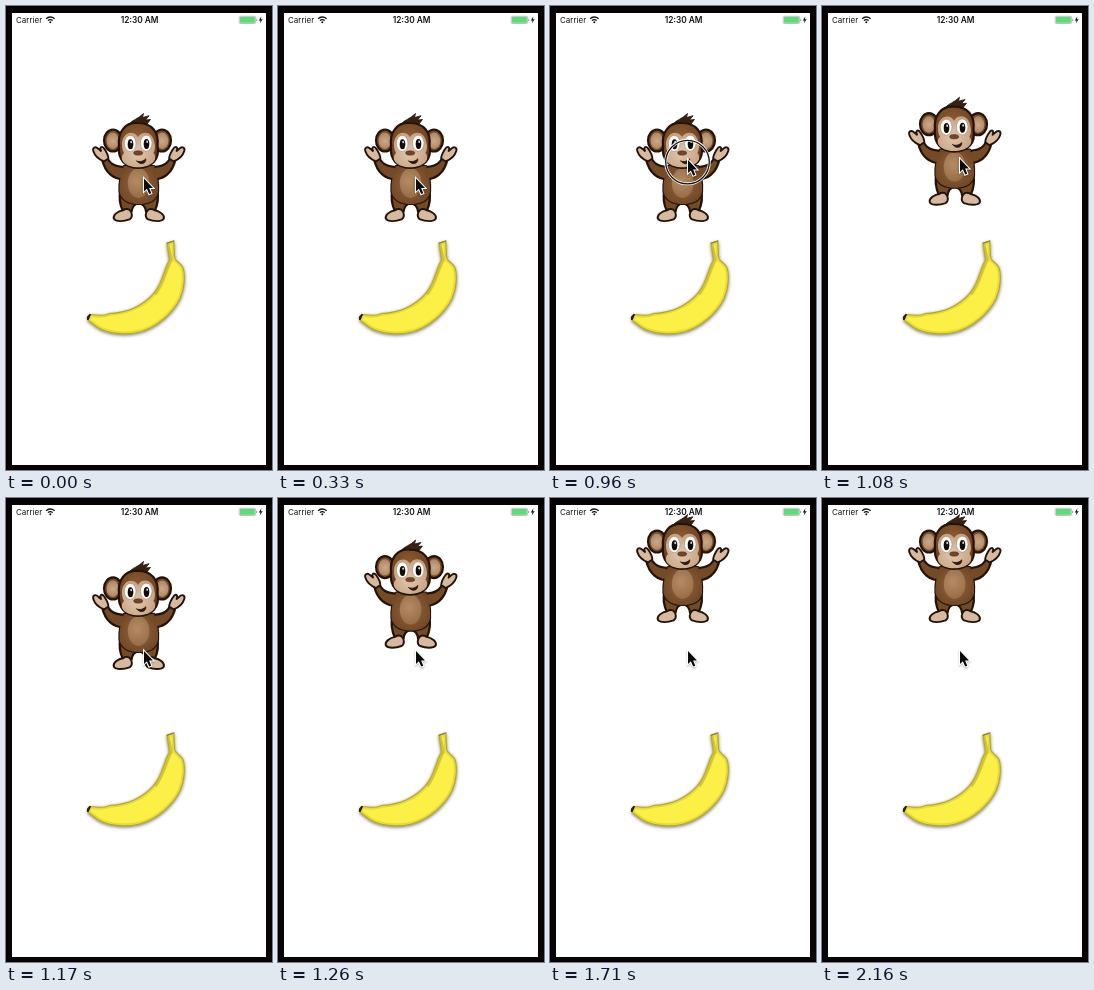
Animation of 266 by 464 pixels, one loop 2220 ms. Source, as an HTML page with a canvas:

```html
<!DOCTYPE html>
<html lang="en">
<head>
<meta charset="utf-8">
<title>Fling the monkey</title>
<style>
html, body { margin: 0; width: 100%; height: 100%; overflow: hidden; background: #070303; }
canvas { display: block; width: 266px; height: 464px; }
</style>
</head>
<body>
<canvas id="stage"></canvas>
<script>
const W = 266, H = 464, LOOP = 2220;
const PRESS = 720, RELEASE = 1036, FLING = 479;
const INK = '#21120a', FUR = '#754a27', SKIN = '#d6b99f';
const canvas = document.getElementById('stage');
const ratio = window.devicePixelRatio || 1;
canvas.width = W * ratio;
canvas.height = H * ratio;
const ctx = canvas.getContext('2d');

const clamp = v => Math.max(0, Math.min(1, v));
const easeOut = u => 1 - (1 - u) ** 2;

function shape(d, fill, stroke, width = 2.2) {
  const path = new Path2D(d);
  if (fill) { ctx.fillStyle = fill; ctx.fill(path); }
  if (stroke) { ctx.strokeStyle = stroke; ctx.lineWidth = width; ctx.stroke(path); }
}

function oval(x, y, rx, ry, fill, stroke, width = 2.2) {
  ctx.beginPath();
  ctx.ellipse(x, y, rx, ry, 0, 0, Math.PI * 2);
  if (fill) { ctx.fillStyle = fill; ctx.fill(); }
  if (stroke) { ctx.strokeStyle = stroke; ctx.lineWidth = width; ctx.stroke(); }
}

function glow(x, y, r, inner, outer) {
  const g = ctx.createRadialGradient(x, y, 0, x, y, r);
  g.addColorStop(0, inner);
  g.addColorStop(1, outer);
  return g;
}

function shadow(color, blur, dy) {
  ctx.shadowColor = color;
  ctx.shadowBlur = blur * ratio;
  ctx.shadowOffsetY = dy * ratio;
}

function text(str, x, font, align) {
  ctx.font = font;
  ctx.textAlign = align;
  ctx.fillStyle = '#111';
  ctx.fillText(str, x, 17);
}

function drawStatusBar() {
  text('Carrier', 10, '8px Inter, sans-serif', 'left');
  text('12:30 AM', 133.6, '600 8.3px Inter, sans-serif', 'center');
  ctx.strokeStyle = '#111';
  ctx.lineWidth = 1.3;
  for (const r of [3.2, 5.8]) {
    ctx.beginPath();
    ctx.arc(44.3, 16.8, r, -Math.PI * 0.76, -Math.PI * 0.24);
    ctx.stroke();
  }
  oval(44.3, 16.2, 1, 1, '#111');
  ctx.strokeStyle = '#9ba69d';
  ctx.lineWidth = 0.7;
  ctx.beginPath();
  ctx.roundRect(233.2, 10.3, 16.4, 7.2, 1.4);
  ctx.stroke();
  ctx.fillStyle = '#5fda76';
  ctx.fillRect(234, 11, 14.8, 5.8);
  ctx.fillStyle = '#9b9b9b';
  ctx.fillRect(250.2, 12.8, 1, 2.2);
  shape('M255.4 10.3 L252.8 14.4 H254.5 L253.8 17.6 L256.6 13.2 H254.9 Z', '#111');
}

function drawBanana() {
  const body = 'M160.5 237 L168.3 234.5 L169 251 C170 255 174.5 256 177.3 261 C180 268 179.5 282 174.5 293 ' +
    'C167 308 151 322 134 326.5 C116 331 98 327 90 321 L81 314 L84 308 C91 308 97 310.5 103 307 ' +
    'C121 306.5 137 299 147 287.5 C157 275 157 264 163 254 Z';
  ctx.save();
  shadow('rgba(0,0,0,.55)', 3.5, 1);
  shape(body, '#fcf047');
  ctx.restore();

  ctx.save();
  ctx.clip(new Path2D(body));
  shape(body, null, 'rgba(190,176,45,.35)', 6);
  shape(body, null, 'rgba(150,140,40,.65)', 2.2);
  shape('M161 237 L165 254 C160 262 158 276 149 288', null, 'rgba(190,174,45,.5)', 4);
  ctx.restore();

  shape('M160.5 237.3 L168.3 234.8', null, '#857d2b', 1.2);
  shape('M81 314 L80.8 311 L83.5 307.8 L85 308.5 L82.6 314 Z', '#29220d');
}

function drawSide() {
  shape('M119 173 C108 174 99 167 96 153 L101 150.5 C103 157 109 161 119 161 Z', FUR, INK);
  shape('M98 155.5 C92 153 88.5 149 87.3 145 C86.3 141.5 89.5 140 92 142.5 L95 145 ' +
    'C93 140.5 96.5 139.5 98.5 143 C100.5 146 102.5 149 102.3 152.5 Z', SKIN, INK, 1.9);
  shape('M114.5 184 C112.5 192 114 199 117 205.5 L125.5 206 C126 201 128 198 133 197 V184 Z', FUR, INK);
  shape('M117 204.3 C112 205 106.5 209 107.8 212.8 C110 216 118 215.5 123.5 213.4 ' +
    'C127 211.5 126.5 206 123 203.5 C121 202.5 119 203 117 204.3 Z', SKIN, INK, 1.9);
}

function drawLimbs() {
  drawSide();
  ctx.save();
  ctx.translate(265.6, 0);
  ctx.scale(-1, 1);
  drawSide();
  ctx.restore();
}

function drawBody() {
  const torso = 'M118 160 C115 167 113 177 113.5 186 C116 196 125 198 132.8 198 C141 198 150 196 152 186 ' +
    'C152.5 177 151 167 148 160 Z';
  shape(torso, null, INK);
  shape('M112 162.2 H153 V171.8 H112 Z', FUR);
  shape(torso, glow(132.5, 178, 25, '#94663d', '#6b4222'));
  oval(132.6, 177, 10.8, 15, glow(131, 175, 18, '#b58b65', '#946b45'));
}

function drawHead() {
  for (const [x, side] of [[107, -1], [156, 1]]) {
    oval(x, 134.5, 9, 11, FUR, INK);
    oval(x + side * 0.2, 134.8, 6.2, 8.2, glow(x, 135, 9, '#cca98a', '#ab8160'));
  }
  shape('M123 118 C127 113.5 132 113 137.5 107.5 L136.5 111.5 L143 109.8 L139.5 114 L144.5 113.5 L141 118 Z',
    '#3a2010', INK, 0.8);
  shape('M132 117 C119 116 111.5 126 113 140 C111.5 153 119 162 132 162 C146 162 154 153 151.5 140 ' +
    'C153 126 146 117 132 117 Z', glow(131, 131, 29, '#8b5c35', '#63391a'), INK);
  shape('M132 131 C127 123 115.5 127 116 139 C116 143 117 145 118 147 C111.5 154 120 161.3 132 161.3 ' +
    'C145 161.3 153 154 147.5 147 C149.3 144 149.3 140 148.5 137 C147 125 136 124 132 131 Z',
    glow(131, 147, 23, '#e0c7ae', '#c49c7b'));
  for (const [x, y] of [[124.2, 137.5], [140.2, 137.2]]) {
    oval(x, y, 5.8, 8, '#fff', '#9b7758', 0.5);
    oval(x + 0.3, y + 0.8, 2.8, 5, '#120b08');
    oval(x + 1, y - 1.5, 0.9, 1.2, '#ddd');
  }
  oval(132.2, 147, 4.5, 2.2, '#70452b', '#4a2919', 0.5);
  shape('M130.5 154.8 C133.5 156.4 137 155.6 139.8 152.8 C140 158.4 134 159.2 130.5 154.8 Z', '#321712', INK, 0.8);
}

function drawMonkey(dy) {
  ctx.save();
  ctx.translate(0, dy);
  ctx.lineJoin = 'round';
  drawLimbs();
  drawBody();
  drawHead();
  ctx.restore();
}

function drawTouch(y) {
  oval(137.5, y + 2, 21.8, 21.8, null, '#fff', 2.9);
  oval(137.5, y + 2, 21.8, 21.8, null, '#15100e', 1.3);
}

function drawCursor(y) {
  ctx.save();
  ctx.translate(138, y);
  ctx.lineJoin = 'miter';
  const arrow = 'M0 0 V13 L2.9 10.3 L5.2 15.6 L7.3 14.7 L5.1 9.5 H9 Z';
  shadow('rgba(0,0,0,.3)', 2, 1);
  shape(arrow, null, '#fff', 2);
  shadow('transparent', 0, 0);
  shape(arrow, '#0b0909');
  ctx.restore();
}

function draw(t) {
  const drag = clamp((t - PRESS) / (RELEASE - PRESS));
  const cursorY = 172.5 - 19.5 * easeOut(drag);
  const rise = 91 * easeOut(clamp((t - RELEASE) / FLING));
  ctx.setTransform(ratio, 0, 0, ratio, 0, 0);
  ctx.fillStyle = '#070303';
  ctx.fillRect(0, 0, W, H);
  ctx.fillStyle = '#fff';
  ctx.fillRect(6, 7, 254, 452);
  drawBanana();
  drawMonkey(-rise);
  drawStatusBar();
  if (t >= PRESS && t < RELEASE) drawTouch(cursorY);
  drawCursor(cursorY);
}

const start = performance.now();
function tick() {
  draw((performance.now() - start) % LOOP);
  requestAnimationFrame(tick);
}
tick();
</script>
</body>
</html>
```
